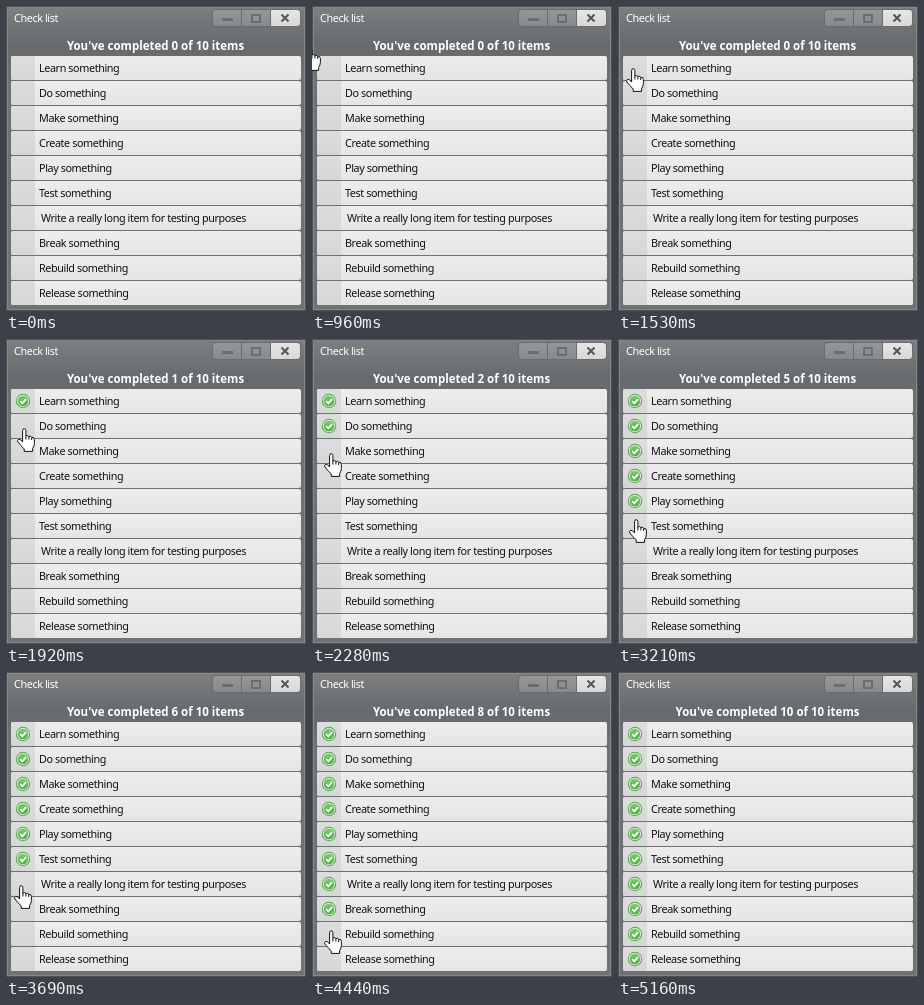
These frames come from a looping animation (300x305 px, 6090 ms). An HTML page with a canvas:

```html
<!DOCTYPE html>
<html lang="en">
<head>
<meta charset="utf-8">
<title>Check list</title>
<style>
  html, body { margin: 0; width: 100%; height: 100%; overflow: hidden; background: #6b6d6f; }
  canvas { display: block; width: 300px; height: 305px; }
</style>
</head>
<body>
<canvas id="stage" width="300" height="305"></canvas>
<script>
const ctx = document.getElementById('stage').getContext('2d');
const FONT = '"Noto Sans", "Open Sans", sans-serif';
const LOOP = 6090;
const STEP = 30;
const ROW_TOP = 50;
const ROW_PITCH = 25;

// Pointer rhythm: glide in, then rest, click and move on once per beat
const ENTER_AT = 750;
const FIRST_STOP = 1380;
const BEAT = 1150 / 3;
const REST = 150;
const CLICK = 180;
const EXIT_TIME = 180;
const ENTRY = [-18, 30];
const EXIT = [8, 306];

const items = [
  'Learn something', 'Do something', 'Make something', 'Create something',
  'Play something', 'Test something', 'Write a really long item for testing purposes',
  'Break something', 'Rebuild something', 'Release something'
];
const LAST = items.length - 1;

const hand = new Path2D(
  'M5.6 14V2.6Q5.6.7 7.2.7T8.9 2.6V8Q11 6.9 11.9 8.5Q14 7.6 14.7 9.3' +
  'Q17.4 9 17.4 11.5V15.5Q17.4 18 15.6 20.5V23.4H7.2V21Q4 17.8.9 14' +
  'Q0 12 1.6 11.3Q3.4 10.9 5.6 14Z'
);
const knuckles = new Path2D('M8.9 8V11.5M11.9 8.5V11.5M14.7 9.3V12');

function verticalFill(top, bottom, ...colors) {
  const g = ctx.createLinearGradient(0, top, 0, bottom);
  colors.forEach((c, i) => g.addColorStop(i / (colors.length - 1), c));
  return g;
}

function box(x, y, w, h, r, fill) {
  ctx.beginPath();
  ctx.roundRect(x, y, w, h, r);
  ctx.fillStyle = fill;
  ctx.fill();
}

function frame(x, y, w, h, color, width) {
  ctx.strokeStyle = color;
  ctx.lineWidth = width;
  ctx.strokeRect(x, y, w, h);
}

function disc(x, y, r, fill) {
  ctx.beginPath();
  ctx.arc(x, y, r, 0, Math.PI * 2);
  ctx.fillStyle = fill;
  ctx.fill();
}

function line(path, color, width) {
  ctx.strokeStyle = color;
  ctx.lineWidth = width;
  ctx.stroke(new Path2D(path));
}

function label(text, x, y, color) {
  ctx.font = '10.8px ' + FONT;
  ctx.letterSpacing = '-0.4px';
  ctx.textAlign = 'left';
  ctx.fillStyle = color;
  ctx.fillText(text, x, y);
}

function drawWindow() {
  ctx.fillStyle = verticalFill(0, 80, '#7d7f81', '#676a6d', '#6f7173');
  ctx.fillRect(0, 0, 300, 305);
  frame(1.5, 1.5, 297, 302, '#858687', 1);
  frame(0.5, 0.5, 299, 304, '#505254', 1);
  label('Check list', 8, 16, '#fff');
}

function drawButtons() {
  const muted = verticalFill(4, 20, '#959697', '#888a8b');
  box(206, 3, 89, 18, 4, '#6a6c6e');
  box(207, 4, 28, 16, [3, 0, 0, 3], muted);
  box(236, 4, 28, 16, 0, muted);
  box(265, 4, 29, 16, [0, 3, 3, 0], verticalFill(4, 20, '#e6e6e6', '#d8d8d8'));
  box(216, 12, 11, 3, 0, '#6c6d6e');
  frame(246, 9, 8, 7, '#6c6d6e', 2);
  line('M275.5 8.5l7 7m0 -7l-7 7', '#555', 2);
}

function drawHeader(done) {
  ctx.font = 'bold 11.5px ' + FONT;
  ctx.letterSpacing = '0px';
  ctx.textAlign = 'center';
  ctx.fillStyle = '#fff';
  ctx.fillText(`You've completed ${done} of 10 items`, 149.5, 44);
}

function drawCheck(x, y) {
  disc(x, y, 7.2, '#55a54b');
  disc(x, y, 6.2, '#d3ebce');
  disc(x, y, 5.2, verticalFill(y - 5, y + 5, '#7cc970', '#4fb043'));
  line(`M${x - 2.8} ${y + 0.2}l2.1 2.2l3.7 -4.3`, '#fff', 1.8);
}

function drawRow(text, i, checked) {
  const y = ROW_TOP + i * ROW_PITCH;
  const indent = text.length > 20 ? 35 : 33;
  box(5, y, 290, 24, 2, verticalFill(y, y + 24, '#ededed', '#e5e5e5'));
  box(5, y, 24, 24, [2, 0, 0, 2], verticalFill(y, y + 24, '#dddddd', '#d6d6d6'));
  label(text, indent, y + 16, '#111');
  if (checked) drawCheck(17, y + 12);
}

// Resting place beside row i, on a slightly bowed and swaying path
function restAt(i) {
  return [
    8 + 5 * Math.abs(Math.sin(Math.PI * i / 6)),
    62 + 24.4 * i + 5 * Math.sin(Math.PI * i / LAST)
  ];
}

function glide(from, to, p) {
  const k = Math.min(1, Math.max(0, p));
  return from.map((v, axis) => Math.round(v + (to[axis] - v) * k));
}

function pointerAt(t) {
  if (t < FIRST_STOP) {
    return glide(ENTRY, restAt(0), (t - ENTER_AT) / (FIRST_STOP - ENTER_AT));
  }
  const i = Math.min(LAST, Math.floor((t - FIRST_STOP) / BEAT));
  const moving = t - FIRST_STOP - i * BEAT - REST;
  return i < LAST
    ? glide(restAt(i), restAt(i + 1), moving / (BEAT - REST))
    : glide(restAt(i), EXIT, moving / EXIT_TIME);
}

function drawPointer(t) {
  ctx.save();
  ctx.translate(...pointerAt(t));
  ctx.lineJoin = 'round';
  ctx.lineWidth = 1;
  ctx.fillStyle = '#fff';
  ctx.strokeStyle = '#111';
  ctx.fill(hand);
  ctx.stroke(hand);
  ctx.stroke(knuckles);
  ctx.restore();
}

function draw(now) {
  const t = Math.floor((now % LOOP) / STEP) * STEP;
  const isChecked = i => t >= FIRST_STOP + i * BEAT + CLICK;
  drawWindow();
  drawButtons();
  drawHeader(items.filter((_, i) => isChecked(i)).length);
  items.forEach((text, i) => drawRow(text, i, isChecked(i)));
  drawPointer(t);
}

let start;
function tick(now) {
  start ??= now;
  draw(Math.max(0, now - start));
  requestAnimationFrame(tick);
}
draw(0);
requestAnimationFrame(tick);
</script>
</body>
</html>
```
